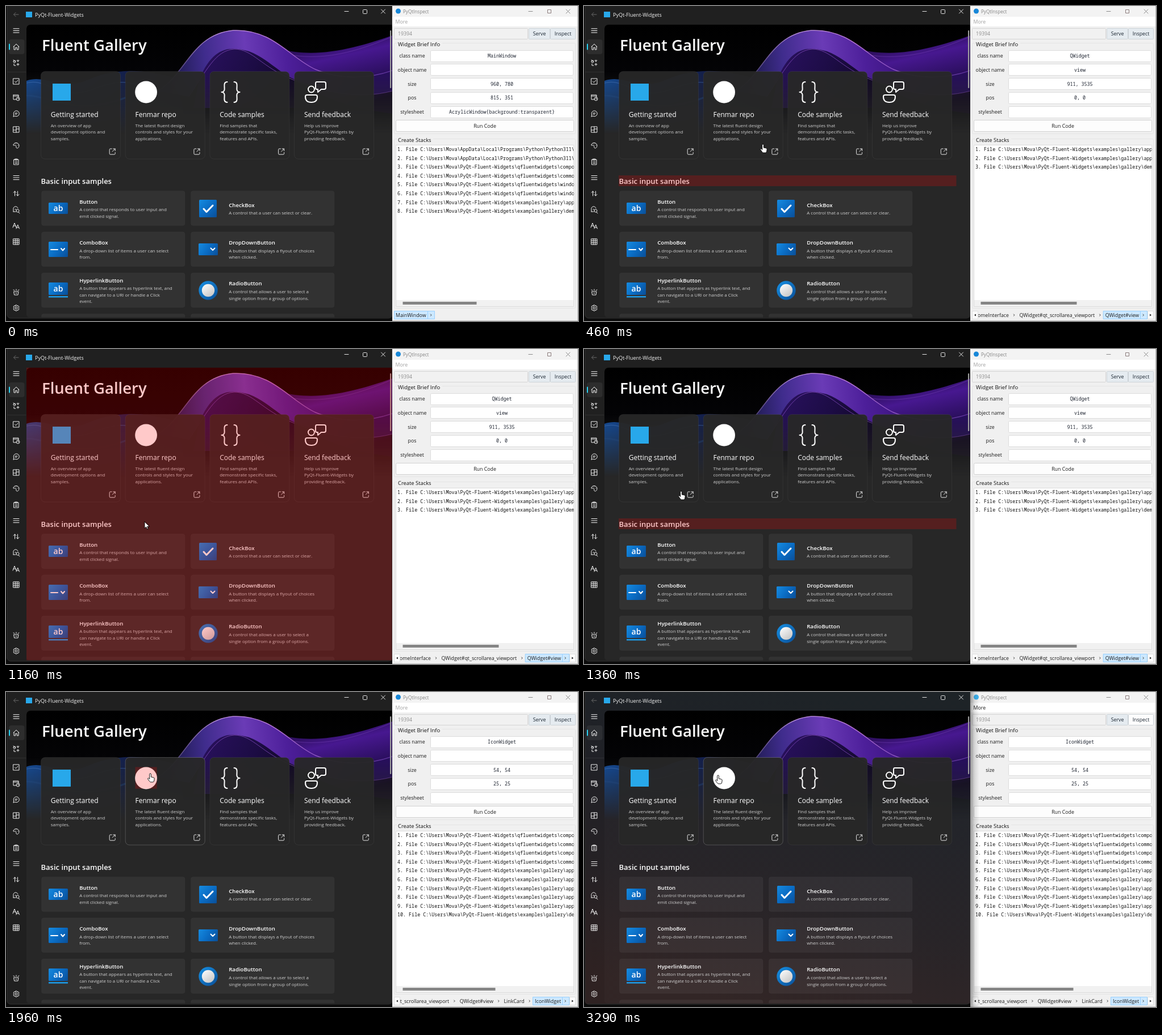
Write an HTML page with a canvas that moves like this. It is 1007 px wide and 556 px high and loops after 3630 ms.

```html
<!DOCTYPE html>
<html lang="en">
<head>
<meta charset="utf-8">
<title>Widget inspector</title>
<style>
html, body { margin: 0; width: 100%; height: 100%; overflow: hidden; background: #0c0c0c; }
canvas { display: block; width: 1007px; height: 556px; }
</style>
</head>
<body>
<canvas id="stage" width="1007" height="556"></canvas>
<script>
const W = 1007, H = 556, LOOP = 3630;
const SANS = '"Open Sans", "Noto Sans", sans-serif';
const MONO = '"Noto Sans Mono", "DejaVu Sans Mono", monospace';
let g = document.getElementById('stage').getContext('2d');

const clamp = v => Math.max(0, Math.min(1, v));

function text(s, x, y, size, color, { weight = 400, align = 'left', font = SANS } = {}) {
  g.font = `${weight} ${size}px ${font}`;
  g.textAlign = align;
  g.fillStyle = color;
  g.fillText(s, x, y);
}
function rect(x, y, w, h, color) {
  g.fillStyle = color;
  g.fillRect(x, y, w, h);
}
function box(x, y, w, h, r, fill, stroke) {
  g.beginPath();
  g.roundRect(x, y, w, h, r);
  if (fill) { g.fillStyle = fill; g.fill(); }
  if (stroke) { g.strokeStyle = stroke; g.lineWidth = 1; g.stroke(); }
}
function disc(x, y, r, fill) {
  g.beginPath();
  g.arc(x, y, r, 0, Math.PI * 2);
  g.fillStyle = fill;
  g.fill();
}
function line(d, x, y, color, width = 1, fill) {
  const p = new Path2D(d);
  g.save();
  g.translate(x, y);
  g.lineCap = g.lineJoin = 'round';
  if (fill) { g.fillStyle = fill; g.fill(p); }
  if (color) { g.strokeStyle = color; g.lineWidth = width; g.stroke(p); }
  g.restore();
}
function grad(x0, y0, x1, y1, ...colors) {
  const l = g.createLinearGradient(x0, y0, x1, y1);
  colors.forEach((c, i) => l.addColorStop(i / (colors.length - 1), c));
  return l;
}

// ---- banner ribbons, painted once ----
const hero = document.createElement('canvas');
hero.width = W;
hero.height = 280;
function paintHero() {
  const screen = g;
  g = hero.getContext('2d');
  g.beginPath();
  g.roundRect(36, 33, 643.5, 238, [7, 0, 0, 0]);
  g.clip();
  rect(36, 33, 644, 238, grad(0, 33, 0, 271, '#000', '#050508', '#15151b'));
  // blue wave on the left
  line('M36 132C70 120 96 150 140 132C180 114 230 106 300 128L330 271H36Z', 0, 0, null, 0,
    grad(36, 0, 330, 0, '#144f9f', '#102f70', '#151b40', '#0d0d18'));
  line('M36 136C72 126 96 168 150 148C190 132 215 128 260 150', 0, 0, 'rgba(70,125,205,.6)', 1.2);
  line('M36 158C80 158 120 196 210 162', 0, 0, 'rgba(36,95,180,.4)', 3);
  // wave behind on the right
  line('M428 52C510 104 600 80 680 52V190C600 180 540 160 470 100Z', 0, 0, null, 0,
    grad(560, 50, 590, 180, '#1c083c', '#471890', '#2c0f60', '#100620'));
  line('M460 76C540 104 610 84 680 54', 0, 0, 'rgba(112,60,175,.6)', 1);
  // main arch
  line('M268 150C318 118 328 50 400 43C470 40 500 92 545 112C590 131 640 128 680 114V150C620 166 560 152 505 130C450 108 434 76 402 76C368 78 352 116 322 160Z', 0, 0, null, 0,
    grad(280, 130, 640, 100, '#15163f', '#3f2c8c', '#6a3bb6', '#4d1f9a', '#3a127c', '#270e5e'));
  line('M340 130C366 68 396 72 428 80C470 96 490 134 545 140V180H330Z', 0, 0, null, 0,
    grad(340, 76, 520, 170, '#2a1160', '#1c0c44', '#0c0618'));
  line('M268 150C318 118 328 50 400 43C470 40 500 92 545 112C590 131 640 128 680 114', 0, 0,
    grad(268, 0, 680, 0, '#22224c', '#b48bd8', '#b070d0', '#7a45b8', '#5a3098'), 1.5);
  line('M322 160C352 116 368 78 402 76C434 76 450 108 505 130C560 152 620 166 680 150', 0, 0, 'rgba(140,80,200,.7)', 1);
  g.globalCompositeOperation = 'destination-out';
  rect(0, 115, W, 165, grad(0, 115, 0, 225, 'rgba(0,0,0,0)', 'rgba(0,0,0,.5)', '#000'));
  g = screen;
}
paintHero();

// ---- gallery window ----
const NAV = [
  [72, 'M-5 0L0-5L5 0M-4-1V5H-1.3V1.5H1.3V5H4V-1'],
  [100, 'M-5-2a2 2 0 1 0 4 0a2 2 0 1 0-4 0M1-4l2 2 2-2M3-5v3M-4 2v3h3M1 3h4M3 1v4M-5-5l3 3'],
  [133, 'M-5-5H5V5H-5ZM-2.5 0L-.7 2L3-2'],
  [161, 'M-5-4H4V0M-5-4V4H0M-5-2H4M0 3a3 3 0 1 0 6 0a3 3 0 1 0-6 0M3 1.5V3h1.5'],
  [190, 'M-5 5L-4.3 2A5 5 0 1 1-2 4.4ZM-2-1H2M-2 1H1'],
  [218, 'M-5-5H5V5H-5ZM0-5V5M-5 1H0M0-1H5'],
  [246, 'M-5-1C-4-6 4-6 5 0C5 5 1 6 0 4C-1 2 1 1-1 0C-3-1-5 2-5-1M-2-3h.1M1-3h.1M3 0h.1'],
  [275, 'M-4-4H4V5H-4ZM-2-5H2V-3H-2ZM-2 0H2M-2 2.5H2'],
  [303, 'M-5-3.5H5M-5 0H5M-5 3.5H5'],
  [331, 'M-2.5 4V-4M-5-1.5L-2.5-4L0-1.5M2.5-4V4M0 1.5L2.5 4L5 1.5'],
  [360, 'M-5 3V-1A4 4 0 0 1 3-3M-5 3H-1M0 1.5a2.5 2.5 0 1 0 5 0a2.5 2.5 0 1 0-5 0M4 4l2 2M-2-1h2'],
  [388, 'M-6 3L-3-5L0 3M-5 0H-1M0 5L2.7-2L5.5 5M1 3H4.5'],
  [416, 'M-5-5H5V5H-5ZM-1.7-5V5M1.7-5V5M-5-1.7H5M-5 1.7H5'],
  [505, 'M-4-1H4L3 5H-3ZM-5-4l2 1M0-5v2M5-4l-2 1M-1 2h2'],
  [533, 'M-2 0a2 2 0 1 0 4 0a2 2 0 1 0-4 0M-1.2-5H1.2L1.8-3.4L3.5-4L5-1.8L3.8 0L5 1.8L3.5 4L1.8 3.4L1.2 5H-1.2L-1.8 3.4L-3.5 4L-5 1.8L-3.8 0L-5-1.8L-3.5-4L-1.8-3.4Z']
];
const LINKS = [
  ['Getting started', 'An overview of app', 'development options and', 'samples.'],
  ['Fenmar repo', 'The latest fluent design', 'controls and styles for your', 'applications.'],
  ['Code samples', 'Find samples that', 'demonstrate specific tasks,', 'features and APIs.'],
  ['Send feedback', 'Help us improve', 'PyQt-Fluent-Widgets by', 'providing feedback.']
];
const SAMPLES = [
  ['Button', 'A control that responds to user input and', 'emit clicked signal.'],
  ['CheckBox', 'A control that a user can select or clear.'],
  ['ComboBox', 'A drop-down list of items a user can select', 'from.'],
  ['DropDownButton', 'A button that displays a flyout of choices', 'when clicked.'],
  ['HyperlinkButton', 'A button that appears as hyperlink text, and', 'can navigate to a URI or handle a Click', 'event.'],
  ['RadioButton', 'A control that allows a user to select a', 'single option from a group of options.']
];
const cardX = i => 61.5 + i * 148.7;
const CARD = { y: 115, w: 140, h: 155.5 };

function blue(x, y, w, h) {
  box(x, y, w, h, 1.5, grad(x, y, x + w, y + h, '#168be0', '#0a6cc4', '#0a4f98'));
}
const ab = y => text('ab', 92, y, 14, '#fff', { weight: 600, align: 'center' });
const ICONS = [
  () => { blue(75, 347, 34, 20); ab(362); },
  () => { blue(340, 342, 31, 31); line('M-8 0L-3 5.5L8-6', 356, 358, '#fff', 3); },
  () => { blue(75, 416, 34, 27); line('M-11 0H1M7-2L10 1.5L13-2', 90, 430, '#fff', 2); },
  () => { blue(339, 419, 34, 21); line('M-3.5-1.5L0 2L3.5-1.5', 364, 429, '#fff', 2); },
  () => { blue(75, 488, 34, 22); ab(504); rect(75, 512, 34, 2.5, '#1c9be8'); },
  () => {
    disc(356, 502, 16.7, grad(340, 486, 372, 518, '#1690e4', '#0a4f98'));
    disc(356, 502, 11.2, grad(348, 492, 364, 513, '#fafafa', '#c4c4c4'));
  }
];

function linkCard(i, hover) {
  const x = cardX(i), [name, ...body] = LINKS[i];
  box(x, CARD.y + .5, CARD.w, CARD.h - 1, 7, 'rgba(39,39,40,.95)', hover ? 'rgba(255,255,255,.2)' : 'rgba(255,255,255,.06)');
  if (i === 0) rect(82, 137, 32, 30, '#28a8ea');
  if (i === 1) disc(246.6, 152, 19.4, '#fff');
  if (i === 2) {
    line('M-6-18C-14-18-10-8-11-4Q-12 0-16 0Q-12 0-11 4C-10 8-14 18-6 18', 395.5, 152, '#fff', 2);
    line('M6-18C14-18 10-8 11-4Q12 0 16 0Q12 0 11 4C10 8 14 18 6 18', 395.5, 152, '#fff', 2);
  }
  if (i === 3) line('M-13-5a5.5 5.5 0 1 0 11 0a5.5 5.5 0 1 0-11 0M-18 8Q-18 5-15 5H0Q3 5 3 8Q3 18-7.5 18T-18 8ZM2-18H15Q18-18 18-15V-8Q18-5 15-5H10L4 0V-5H2Q0-5 0-8V-15Q0-18 2-18Z', 545, 152, '#fff', 2);
  text(name, x + 17.3, 196, 12, '#fff');
  body.forEach((s, k) => text(s, x + 17.3, 213.8 + k * 11.4, 8, '#cfcfcf'));
  line('M-1-5H-3.5Q-5-5-5-3.5V3.5Q-5 5-3.5 5H3.5Q5 5 5 3.5V1.5M1.5-5H5V-1.5M5-5L0 0', x + 125.7, 257, '#e8e8e8', 1);
}

function gallery(t, tint) {
  rect(0, 0, 680, H, '#0b0b0b');
  box(2, -1, 677.5, 552, [0, 0, 6, 6], '#202020', '#333');
  box(36, 33, 643.5, 516.5, [7, 0, 0, 5], '#272727');
  if (tint) {
    g.globalAlpha = .5 * tint;
    rect(2.5, 0, 677, 550, grad(380, 0, 260, 550, '#1b262e', '#20222d', '#2a2229', '#3d2424'));
    g.globalAlpha = 1;
  }
  g.drawImage(hero, 0, 0);

  // title bar and navigation
  line('M4 0H-4M-1-3.5L-4.5 0L-1 3.5', 18, 15, '#6a6a6a', 1);
  rect(35, 10, 11, 10, '#28a8ea');
  text('PyQt-Fluent-Widgets', 51, 18.7, 9, '#f2f2f2');
  line('M-3.5 0H3.5', 599.5, 9.5, '#e4e4e4', 1);
  box(628.5, 6.5, 7, 7, 1, null, '#e4e4e4');
  line('M-3.5-3.5L3.5 3.5M3.5-3.5L-3.5 3.5', 664, 9.5, '#e4e4e4', 1);
  line('M-5-3.5H5M-5 0H5M-5 3.5H5', 18, 43.5, '#fff', 1);
  box(5, 59, 27.5, 26, 4, 'rgba(255,255,255,.06)');
  box(5, 66.5, 2, 11, 1, '#29d5f5');
  rect(2.5, 116, 33, 1, 'rgba(255,255,255,.07)');
  NAV.forEach(([y, d]) => line(d, 18, y, '#f0f0f0', 1));

  // page
  text('Fluent Gallery', 63, 78.5, 27.5, '#fff', { weight: 600 });
  LINKS.forEach((_, i) => linkCard(i, i === 1 && t >= 1670));
  text('Basic input samples', 61.5, 314, 13, '#fff', { weight: 600 });
  for (let i = 0; i < 8; i++) {
    const x = i % 2 ? 325.5 : 62.5, y = 326.5 + (i >> 1) * 72.3;
    g.save();
    g.beginPath();
    g.rect(36, 320, 643, 229.5);
    g.clip();
    box(x, y, 252.5, 61, 4, 'rgba(255,255,255,.052)', 'rgba(255,255,255,.025)');
    g.restore();
    if (!SAMPLES[i]) continue;
    const [name, ...body] = SAMPLES[i];
    const top = y + 33.9 - body.length * 5.7;
    ICONS[i]();
    text(name, x + 66.7, top - .2, 9.65, '#fff', { weight: 600 });
    body.forEach((s, k) => text(s, x + 66.7, top + 13.4 + k * 11.5, 8, '#cfcfcf'));
  }
  box(676, 43, 2.2, 102, 1, '#9b9b9b');
}

// ---- inspector window ----
const HOME = 'C:\\Users\\Mova\\', REPO = HOME + 'PyQt-Fluent-Widgets\\';
const PY = HOME + 'AppData\\Local\\Programs\\Python\\Python311\\Lib\\runpy.py';
const COMPO = REPO + 'qfluentwidgets\\components\\widgets', COMM = REPO + 'qfluentwidgets\\common\\config.py';
const WIN = REPO + 'qfluentwidgets\\window\\fluent_window.py';
const APP = REPO + 'examples\\gallery\\app\\view', DEMO = REPO + 'examples\\gallery\\demo.py';
const apps = n => [...Array(n).fill(APP), DEMO];
const PATH = ['homeInterface', 'QWidget#qt_scrollarea_viewport', 'QWidget#view', 'LinkCard', 'IconWidget'];

const card = (pos, ghost) => ({ info: ['LinkCard', ghost || '', '198, 220', pos, ''], ghost: !!ghost, stack: apps(5), crumbs: PATH.slice(0, 4), bar: 169 });
const PANELS = {
  main: { info: ['MainWindow', '', '960, 780', '815, 351', 'AcrylicWindow{background:transparent}'], stack: [PY, PY, COMPO, COMM, WIN, WIN, APP, DEMO], crumbs: ['MainWindow'], bar: 130 },
  view: { info: ['QWidget', 'view', '911, 3535', '0, 0', ''], stack: apps(2), crumbs: PATH.slice(0, 3), bar: 169 },
  first: card('36, 0'),
  second: card('246, 0'),
  fading: card('246, 0', 'view'),
  icon: { info: ['IconWidget', '', '54, 54', '25, 25', ''], stack: [COMPO, COMM, COMPO, COMM, ...apps(5)], crumbs: PATH, bar: 163 }
};
const ROWS = ['class name', 'object name', 'size', 'pos', 'stylesheet'];

function crumbs(names) {
  const size = 8.8, ink = '#1c1c1c', chevron = 'M-1-1.5L.5 0L-1 1.5';
  const hot = (x, w) => box(x + .5, 538.5, w, 14, 0, '#cce8ff', '#99d1ff');
  if (names.length === 1) {
    hot(683, 59);
    hot(742, 12);
    text(names[0], 686, 549, size, ink);
    line(chevron, 748.5, 545.5, '#333', 1);
    return;
  }
  g.save();
  g.beginPath();
  g.rect(694, 534, 312, 22);
  g.clip();
  g.font = `400 ${size}px ${SANS}`;
  let right = 977;
  [...names].reverse().forEach((s, i) => {
    const w = g.measureText(s).width;
    if (!i) { hot(right - w - 4, w + 6); hot(979, 12); }
    text(s, right - w, i ? 548.5 : 549, size, ink);
    line(chevron, right - w - 9, 545.5, '#333', 1);
    right -= w + 18.5;
  });
  g.restore();
  line(chevron, 985, 545.5, '#333', 1);
  box(683.5, 538.5, 10, 14, 0, '#fbfbfb', '#e0e0e0');
  box(992.5, 538.5, 10, 14, 0, '#fbfbfb', '#e0e0e0');
  line('M1.5-2V2L-1.5 0Z', 688.5, 545.5, null, 0, '#222');
  line('M-1.5-2V2L1.5 0Z', 997.5, 545.5, null, 0, '#222');
}

function inspector(p, done, shade) {
  const edge = '#d4d4d4', mid = { align: 'center' };
  rect(680, 0, 327, H, '#f0f0f0');
  rect(680, 0, 327, 19, '#f3f3f3');
  rect(680, 19, 327, 17, '#fff');
  disc(690.5, 9, 4.5, done ? '#3fb4f0' : '#1787d8');
  text('PyQtInspect', 699, 12.5, 8.1, '#858585');
  line('M-3.5 0H3.5', 923.5, 9.5, '#8a8a8a', 1);
  box(953.5, 6.5, 6, 6, 0, null, '#8a7a7a');
  line('M-3.5-3.5L3.5 3.5M3.5-3.5L-3.5 3.5', 989.5, 9.5, '#8a8a8a', 1);
  text('More', 685.5, 30.8, 8.8, done ? '#1c1c1c' : '#a0a0a0');
  box(683.5, 39.5, 235, 19, 1, '#f1f1f1', edge);
  text('19394', 690, 52.3, 8.8, '#8c8c8c');
  box(920.5, 39.5, 37, 19, 1, '#e5ebf0', '#cdd3d8');
  box(958.5, 39.5, 44, 19, 1, done ? '#fdfdfd' : '#e5ebf0', '#cdd3d8');
  text('Serve', 939, 52.3, 8.8, '#1c2733', mid);
  text('Inspect', 980.5, 52.3, 8.8, '#1c2733', mid);
  box(683.5, 65.5, 319, 160, 2, null, '#e4e4e4');
  rect(688, 62, 80, 9, '#f0f0f0');
  text('Widget Brief Info', 690, 71.3, 9.5, '#111');
  ROWS.forEach((s, i) => {
    const y = 88 + i * 24.8;
    text(s, 715, y + 3, 8.8, '#1c1c1c', mid);
    box(747.5, Math.round(y - 10.5) + .5, 251, 20, 2, '#fff', '#dcdcdc');
    text(p.info[i], 873, y + 3, 8.4, p.ghost && i === 1 ? '#c3dcea' : '#1e2430', { font: MONO, align: 'center' });
  });
  box(686.5, 201.5, 313, 20, 2, '#fdfdfd', '#d2d2d2');
  text('Run Code', 843, 215, 8.8, '#1c1c1c', mid);
  box(683.5, 234.5, 319, 299, 2, null, '#e4e4e4');
  rect(688, 230, 64, 9, '#f0f0f0');
  text('Create Stacks', 690, 239.5, 9.4, '#111');
  box(686.5, 245.5, 313, 285, 0, '#fff', '#dcdcdc');
  g.save();
  g.beginPath();
  g.rect(687, 246, 312.5, 272);
  g.clip();
  p.stack.forEach((s, i) => text(`${i + 1}. File ${s}`, 689, 256 + i * 15.6, 8.4, '#111', { font: MONO }));
  g.restore();
  rect(687, 519, 312, 11, '#f1f1f1');
  rect(698.5, 522, p.bar, 5, '#858585');
  crumbs(p.crumbs);
  rect(1006, 0, 1, H, '#bdbdbd');
  rect(680, 555, 327, 1, '#c4c4c4');
  // shadow of the gallery window once it is in front
  if (shade) rect(680, 0, 16, H, grad(680, 0, 696, 0, `rgba(0,0,0,${.36 * shade})`, `rgba(0,0,0,${.1 * shade})`, 'rgba(0,0,0,0)'));
}

// ---- timeline ----
const AREA = {
  window: [2, 0, 678, 551.5, 0],
  body: [36, 33, 643.5, 516.5, 0],
  links: [36, 74, 643.5, 196.5, 0],
  heading: [61, 299, 594.5, 19, 0],
  first: [cardX(0), CARD.y, CARD.w, CARD.h, 6],
  second: [cardX(1), CARD.y, CARD.w, CARD.h, 6],
  icon: [227.5, 132.5, 38.2, 38.2, 0]
};
const STEPS = [
  [0, 'main'], [50, 'main', 'window'], [100, 'view', 'body'], [300, 'view', 'heading'],
  [500, 'second', 'second'], [780, 'view', 'links'], [870, 'fading', 'second'], [915, 'second', 'second'],
  [1110, 'view', 'body'], [1270, 'view', 'heading'], [1440, 'first', 'first'], [1580, 'second', 'second'],
  [1670, 'icon', 'icon'], [2620, 'icon']
];
const TRACK = [
  [50, 670, 100], [200, 600, 290], [350, 400, 312], [460, 315, 244], [550, 300, 205], [700, 235, 158],
  [820, 204, 153], [870, 211, 155], [950, 235, 180], [1050, 241, 245], [1160, 244, 305], [1210, 236, 311],
  [1300, 188, 288], [1360, 171, 251], [1450, 155, 200], [1550, 190, 165], [1670, 251, 149],
  [1960, 254, 144], [2160, 256, 146], [2310, 256, 146], [2470, 236, 147]
];

function pointer(t) {
  if (t < TRACK[0][0]) return;
  const i = TRACK.findLastIndex(k => k[0] <= t);
  const a = TRACK[i], b = TRACK[i + 1] || a;
  const u = a === b ? 0 : (t - a[0]) / (b[0] - a[0]);
  const x = a[1] + (b[1] - a[1]) * u, y = a[2] + (b[2] - a[2]) * u;
  const onCard = y > CARD.y && y < CARD.y + CARD.h && LINKS.some((_, k) => x >= cardX(k) - 1 && x <= cardX(k) + CARD.w);
  const shape = onCard
    ? 'M-1.4 1.3a1.4 1.4 0 0 1 2.8 0V6L5.3 6.8Q7.3 7.2 7.2 9L6.6 13Q6.3 15 4.5 15H.8Q-.5 15-1.2 13.8L-4.3 9.6Q-4.8 8.3-3.7 8Q-2.6 7.9-1.4 9.3Z'
    : 'M0 0V11.5L2.7 9L4.5 13L6.3 12.2L4.6 8.3H8.2Z';
  line(shape, x, y, '#000', .9, '#fff');
}

function frame(now) {
  const t = now % LOOP;
  const tint = clamp((t - 2620) / 420);
  const [, panel, area] = STEPS.findLast(s => s[0] <= t);
  rect(0, 0, W, H, '#0c0c0c');
  gallery(t, tint);
  if (area) box(...AREA[area], 'rgba(255,0,0,.21)');
  inspector(PANELS[panel], t >= 2620, tint);
  pointer(t);
}

let start;
function tick(now) {
  start ??= now;
  frame(now - start);
  requestAnimationFrame(tick);
}
frame(0);
requestAnimationFrame(tick);
</script>
</body>
</html>
```
